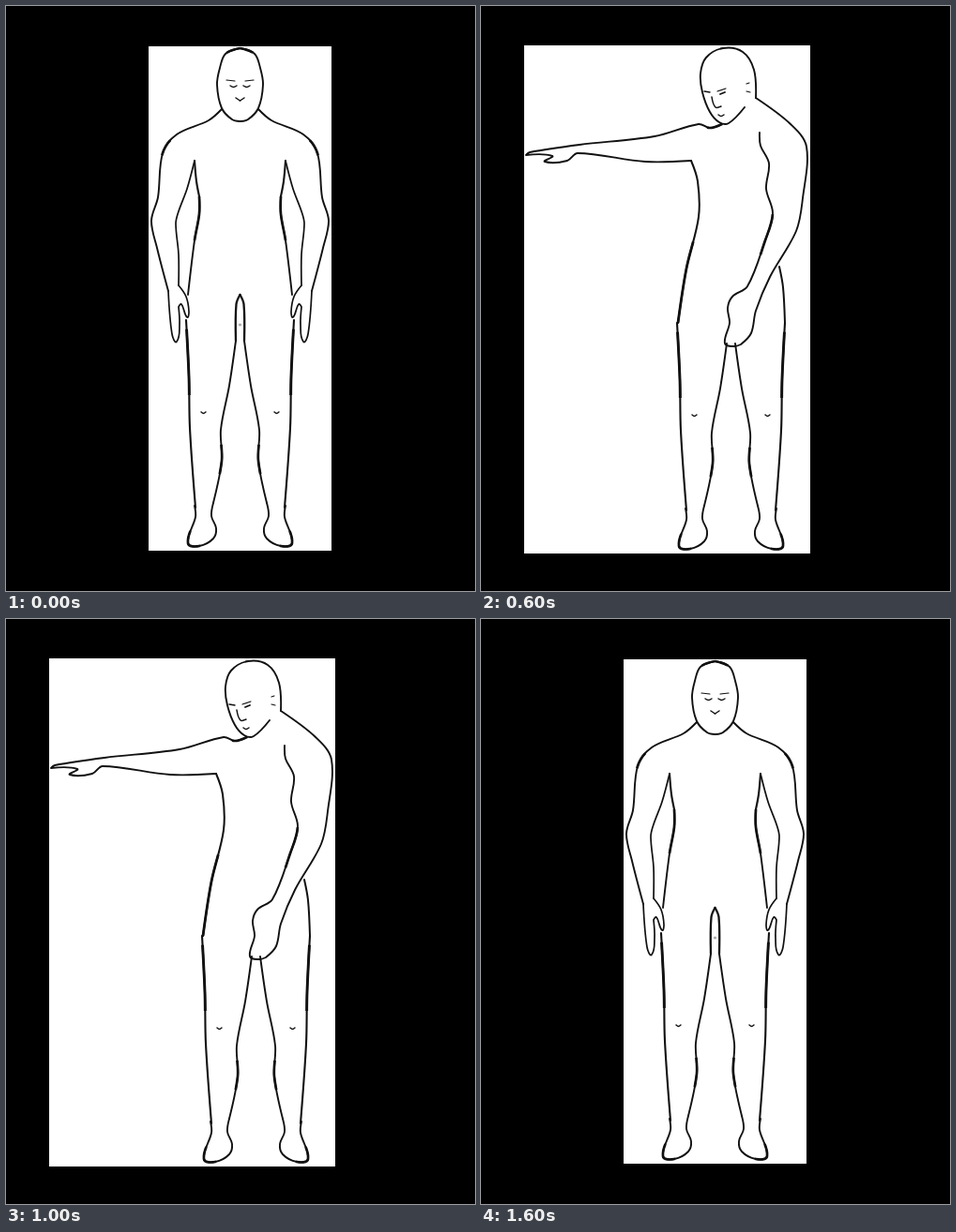
An HTML page for the animation above (1800 ms loop, 500 by 624 pixels).

```html
<!DOCTYPE html>
<html lang="en">
<head>
<meta charset="utf-8">
<title>Arm raise</title>
<style>
html, body { margin: 0; width: 100%; height: 100%; overflow: hidden; background: #000; }
svg { display: block; width: 500px; height: 624px; }
path, ellipse { fill: none; stroke: #111; stroke-linecap: round; stroke-linejoin: round; }
.heavy { stroke-linecap: butt; }
</style>
</head>
<body>
<svg id="stage" viewBox="0 0 500 624"></svg>
<script>
const STEP = 200;
const CYCLE = [0, 1, 2, 3, 4, 3, 2, 1, 0];

// Smooth curve through key points; "/" makes the point before it a corner
function curve(keys) {
  const p = [], corner = new Set();
  for (const k of keys.split(' ')) {
    if (k === '/') corner.add(p.length - 1);
    else p.push(k.split(',').map(Number));
  }
  const dist = (a, b) => Math.hypot(b[0] - a[0], b[1] - a[1]);
  const handle = (i, j) => {
    const a = p[i - 1], b = p[i + 1];
    if (!a || !b || corner.has(i)) return p[i];
    const s = (j - i) * dist(p[i], p[j]) / 3 / (dist(a, b) || 1);
    return p[i].map((v, k) => (v + (b[k] - a[k]) * s).toFixed(2));
  };
  let d = `M${p[0]}`;
  for (let i = 1; i < p.length; i++) d += `C${handle(i - 1, i)} ${handle(i, i - 1)} ${p[i]}`;
  return d;
}

// Stroke whose part between from and to (0..1) is drawn heavier
function line(keys, w = 1.9, from = 0, to = 0) {
  const d = curve(keys);
  const thin = `<path d="${d}" stroke-width="${w}"/>`;
  if (to <= from) return thin;
  return thin + `<path class="heavy" d="${d}" pathLength="1" stroke-width="${w + 0.8}"
    stroke-dasharray="0 ${from} ${to - from} 2"/>`;
}
const shift = (x, y, body) => `<g transform="translate(${x} ${y})">${body}</g>`;
const flip = body => `<g transform="translate(499 0) scale(-1 1)">${body}</g>`;
const both = body => body + flip(body);
const tick = (x, y, w = 5) => line(`${x},${y} ${x + w / 2},${y + 1.5} ${x + w},${y}`, 1.4);
const panel = (x0, y0, x1, y1) =>
  `<rect x="${x0}" y="${y0}" width="${x1 - x0}" height="${y1 - y0}" fill="#fff"/>`;

// Front view: one half, mirrored about the middle
const head = both(
  line('249.5,45 234,51 228,66 225,84 230,109 241,121 249.5,123', 1.9, 0, 0.14) +
  line('235,79 244,80', 1.2) + tick(239, 85, 7) + line('245,98 249.5,101', 1.5));
const arm =
  line('230,110 216,122 182,137 167,157 162,204 155,229 161,258 173,304', 1.9, 0.28, 0.36) +
  line('184,298 184,265 181,232 184,219 193,195 201,165', 1.7) +
  line('173,304 177,350 182,358 185,340 184,321 / 187,318 193,332 195,326 192,310 184,298', 1.7);
const armpit = line('201,165 203,187 206,203', 2.1);
const flank = line('206,203 206,222 201,250 194,308', 1.9, 0, 0.45);
const hip = line('194,308 192,336');
const legs = both(
  line('192,335 195,395 196,450 202,535', 2.1, 0.05, 0.4) +
  line('201,533 202,545 194,573 206,576 221,568 224,557 219,544 221,530', 1.9, 0.25, 0.5) +
  line('221,530 230,485 229,452 238,405 245,357', 1.9, 0.18, 0.36) + tick(208, 433));
const crotch = both(line('245,357 245.5,318 249.5,308', 2.3)) +
  '<circle cx="249.5" cy="340" r="1.6" fill="#aaa"/>';
const base = head + legs + crotch + flip(arm + armpit + flank);

const standing = panel(152, 43, 347, 581) + base + arm + armpit + flank;

const bent = panel(154, 44, 345, 582) + shift(-2, 1, base + armpit + flank + hip +
  line('230,110 216,122 182,137 167,157 162,204 158,222 172,242 187,228 193,195 201,165') +
  '<ellipse cx="175" cy="202" rx="9" ry="13" stroke-width="1.9"/>');

const raised = panel(149, 44, 351, 582) + shift(4, 1, base + flank + hip) +
  line('240,118 217,126 182,116', 1.9, 0, 0.15) +
  line('182,116 184,102 174,90 165,89 155,84 152,92 154,108 159,114 / 154,129 165,147 180,150 / 188,165 210,196') +
  line('182,112 178,115 / 180,123 170,121') + line('205,163 213,174 224,183', 1.3);

const pointing = panel(46, 42, 351, 584) + shift(17, 3, legs) +
  line('293,98 291,68 279,49 258,45 240,55 234,72 236,92 244,113 254,124 264,125 281,108') +
  line('293,98 330,126 347,150 343,205 336,240 308,289 293,325 288,349 277,361 / 270,363 260,360 ' +
    '265,338 263,322 268,310 284,299 303,250 311,221 304,195 307,168 298,149 297,135', 1.9, 0.76, 0.84) +
  line('238,91 244,92', 1.4) + line('252,91 261,88', 1.2) + line('255,94 260,92', 1.8) +
  line('246,97 250,108 256,107', 1.5) + tick(253, 116, 6) +
  both('') + line('283,83 286,82', 1.2) + line('283,91 287,92', 1.2) +
  line('257,126 244,130 232,126 185,139 105,148 52,156 48,159 / 76,160 68,166 92,165 103,157 175,166 224,165', 1.9, 0, 0.04) +
  line('224,165 231,187 232,225 219,280 210,338', 2, 0.5, 1) + line('318,278 322,300 324,338', 2);

const turned = panel(163, 45, 336, 581) +
  line('234,83 234,62 218,48 198,49 183,62 178,85 187,104 / 191,116 206,131 224,125', 2.2) +
  line('234,83 252,102 285,115 305,138 309,172 304,220 320,270 328,335 325,385 329,440 320,535', 2, 0, 0.25) +
  line('191,83 196,77 203,83 200,97', 1.6) +
  line('220,131 203,157 188,183 167,201 / 165,207 172,208 190,193 208,186', 1.6) +
  line('206,160 209,182 227,205 231,249', 1.9, 0.3, 1) + line('230,252 226,304') +
  line('231,187 248,194', 1.4) + line('243,246 246,249', 1.4) +
  line('247,139 255,173 257,210 247,270 226,306', 1.9, 0, 0.4) +
  line('226,306 210,317 206,338 / 211,341 204,357 / 210,358 212,366 / 220,369 230,362 241,321 ' +
    '270,268 285,232 294,185 294,155', 2, 0.3, 0.5) +
  line('320,535 333,568 318,578 305,567 301,540 304,515 293,458 298,422 281,365 270,325 270,300', 1.9, 0.05, 0.14) +
  line('223,370 226,405 219,470 221,535 215,562 232,569 238,540 254,460 253,420 269,360 272,344') +
  tick(233, 413) + tick(309, 424);

const stage = document.getElementById('stage');
stage.innerHTML = [standing, bent, raised, pointing, turned].map(p => `<g>${p}</g>`).join('');
const poses = [...stage.children];

function draw(ms) {
  const now = CYCLE[Math.floor(ms / STEP) % CYCLE.length];
  poses.forEach((g, i) => { g.style.display = i === now ? '' : 'none'; });
}
function run() {
  draw(performance.now());
  requestAnimationFrame(run);
}
draw(0);
requestAnimationFrame(run);
</script>
</body>
</html>
```
